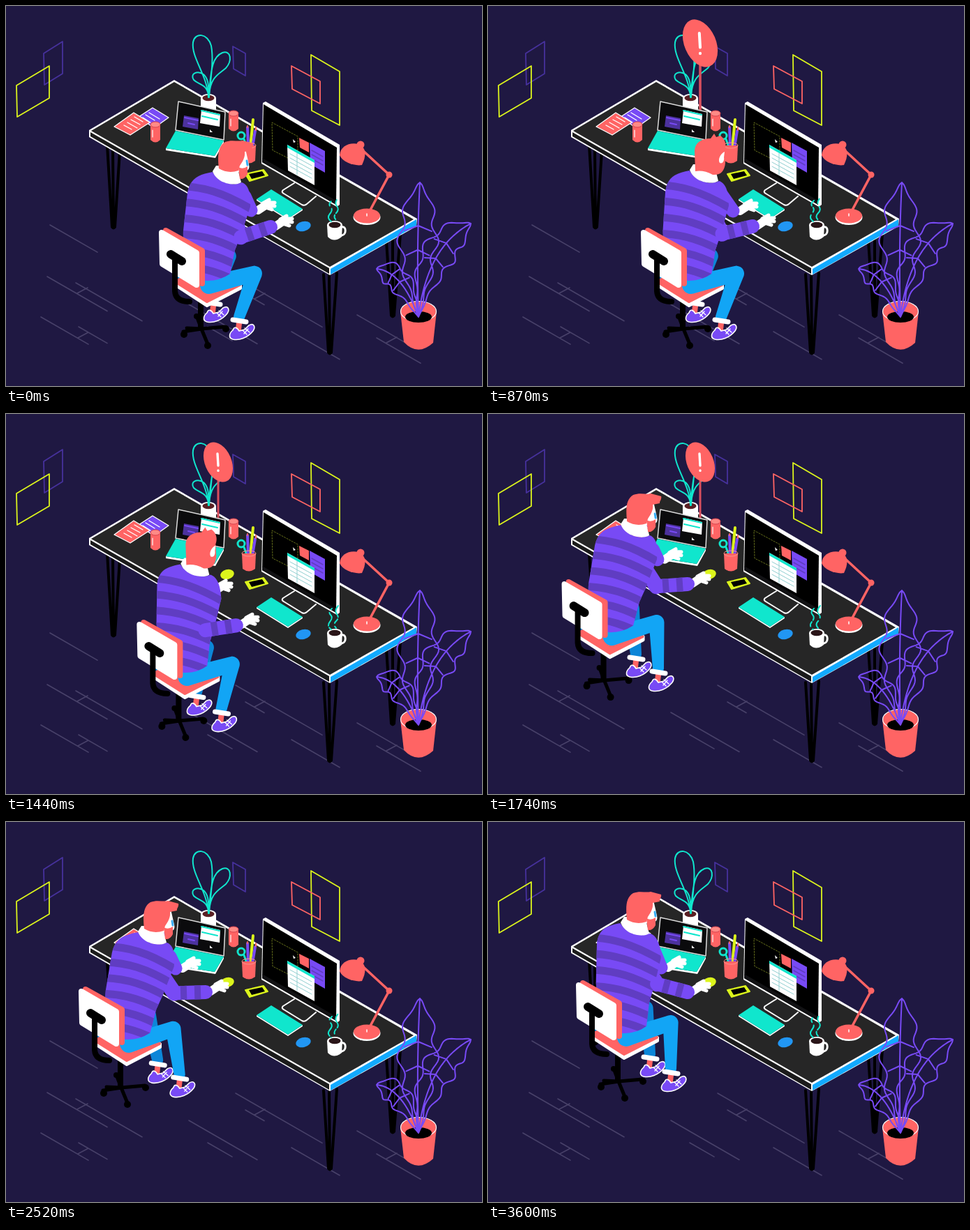
An HTML page that plays this animation: 682x545 px, repeating every 3.63 s.

```html
<!DOCTYPE html>
<html lang="en">
<head>
<meta charset="utf-8">
<title>Desk worker</title>
<style>
html, body { margin: 0; width: 100%; height: 100%; overflow: hidden; background: #1f1842; }
svg { display: block; width: 100vw; height: 100vh; }
.line { fill: none; stroke-linecap: round; stroke-linejoin: round; }
.red { fill: #ff6464; }
.white { fill: #fff; }
.black { fill: #000; }
.teal { fill: #10e6cd; }
.violet { fill: #784af5; }
.sw { stroke: #fff; }
.sk { stroke: #000; }
.sr { stroke: #ff6464; }
.st { stroke: #10e6cd; }
.sv { stroke: #784af5; }
.sy { stroke: #dcf51c; }
.stripe { stroke: #603dc2; }
</style>
</head>
<body>
<svg viewBox="0 0 682 545" preserveAspectRatio="none">
  <defs>
    <clipPath id="shirt"><path id="shirtShape" d="M296 238C275 242 264 247 260 268L254 322Q253 340 260 380L286 394Q305 395 321 384L328 350L336 330L350 288C351 265 346 256 338 253C325 259 305 254 296 238Z"/></clipPath>
    <g id="shoe">
      <path class="line sr" stroke-width="8" d="M-4 3L-5 12"/>
      <path class="violet sw" stroke-width="1.6" d="M-13 13C-11 7 -7 9 -4 14L4 12L10 6C17 2 20 8 16 14C8 24 -4 28 -13 26C-20 24 -18 17 -13 13Z"/>
      <path class="line sw" stroke-width="1.3" d="M1 13L7 19M4 10L11 16M3 18L9 11"/>
      <path class="line sw" stroke-width="7" stroke-linecap="butt" d="M-13 -2L6 1"/>
    </g>
    <g id="hand" class="line sw">
      <path stroke-width="12" d="M1 0L13 -8"/>
      <path stroke-width="5" d="M12 -11L25 -11M12 -7L25 -6M12 -4L21 -1M8 -10L17 -15"/>
    </g>
  </defs>

  <path id="floor" class="line" stroke="#484169" stroke-width="1.6"/>

  <g class="line" stroke-width="1.8">
    <path stroke="#46319c" d="M54 68L81 51V97L55 113ZM325 58L343 68V100L326 90Z"/>
    <path class="sy" d="M15 114L62 86V132L16 159ZM437 70L478 94V171L438 150Z"/>
    <path class="sr" d="M409 86L450 108V140L410 119Z"/>
  </g>

  <!-- desk -->
  <path class="line sk" stroke-width="4" d="M145 200L152 317Q154 320 156 317L163 208M153 204L154 316M455 385L462 497Q464 500 466 497L474 383M463 386L464 496M545 337L552 444Q554 447 556 444L565 327M554 334V443"/>
  <path class="white" d="M119 178L241 106L589 305L588 316L464 386L119 188Z"/>
  <path fill="#262626" d="M122 179L241 109L584 306L464 374Z"/>
  <path fill="#1b1b1b" d="M121 181L463 376V384L121 187Z"/>
  <path fill="#12aaff" d="M465 377L588 306V315L465 385Z"/>

  <!-- papers -->
  <g stroke="#fff" stroke-width="1.3" stroke-linejoin="round">
    <path class="violet" d="M190 159L210 146L233 160L212 175Z"/>
    <path class="red" d="M155 173L183 153L206 167L178 185Z"/>
    <path class="line" d="M200 156L213 164M205 153L220 162M196 160L207 167M169 171L180 177M174 167L188 175M179 163L192 170M184 159L196 166"/>
  </g>

  <!-- small plant -->
  <path class="white" d="M279 132V150H301V132Z"/>
  <ellipse class="white" cx="290" cy="132" rx="11" ry="6"/>
  <ellipse cx="290" cy="132" rx="8.5" ry="4.2" fill="#5a2024"/>
  <path class="line st" stroke-width="2" d="M290 131C289 100 265 74 268 52C271 37 289 39 294 57C298 78 293 105 291 131M290 131C294 98 293 74 310 67C323 63 324 79 315 89C305 98 293 101 291 128M290 128C288 112 276 113 269 106C263 97 274 92 283 98C291 105 290 118 291 128"/>

  <g id="sign">
    <path class="line" stroke="#d94f5e" stroke-width="3" d="M304 96V152"/>
    <ellipse class="red" cx="304" cy="69" rx="19" ry="30" transform="rotate(-23 304 69)"/>
    <path class="line sw" stroke-width="3.4" d="M303 57L304 74M304 81V81.4"/>
  </g>

  <!-- laptop -->
  <path fill="#0b0b0d" stroke="#ddd" stroke-width="1.5" stroke-linejoin="round" d="M247 137L314 152L312 192L243 178Z"/>
  <path fill="#4c329d" d="M255 157L276 161L275 177L253 173Z"/>
  <path class="line sv" stroke-width="2" d="M256 160L275 164M261 168L270 170"/>
  <path class="white" d="M280 149L307 155L306 173L278 168Z"/>
  <path class="line st" stroke-width="2" d="M280 150L306 156M281 158L303 163"/>
  <path class="white" d="M292 177L296 181L292 181Z"/>
  <path class="white" d="M229 204L299 215L312 193V196L300 218L229 207Z"/>
  <path class="teal" d="M243 179L312 193L299 215L229 204Z"/>

  <!-- cans -->
  <g id="can">
    <path class="red" d="M207 170V192Q214 199 221 192V170Z"/>
    <ellipse cx="214" cy="170" rx="7" ry="4" fill="#ff8a86" stroke="#d8434f"/>
    <path class="line sw" stroke-width="1.2" d="M210 178V188"/>
  </g>
  <use href="#can" x="112" y="-16"/>

  <!-- pen cup -->
  <g class="line">
    <circle class="st" cx="337" cy="186" r="5" stroke-width="3"/>
    <path class="st" stroke-width="3" d="M341 191L345 202"/>
    <path class="sy" stroke-width="4" d="M354 163L350 203"/>
    <path class="sv" stroke-width="4" d="M346 174L347 202M357 179L353 203"/>
    <path class="sr" stroke-width="2" d="M346 172V174M358 174V178"/>
  </g>
  <path class="red" d="M338 200L339 222Q348 229 357 222L358 200Z"/>
  <ellipse cx="348" cy="200" rx="10" ry="4" fill="none" stroke="#ff918c"/>

  <path fill="#dcf51c" stroke="#dcf51c" stroke-width="2" stroke-linejoin="round" d="M343 241L369 235L375 243L349 251Z"/>
  <path class="black" d="M348 241L367 237L371 243L352 248Z"/>
  <ellipse cx="317" cy="230" rx="10" ry="7" fill="#dcf51c" transform="rotate(-15 317 230)"/>
  <ellipse cx="426" cy="316" rx="11" ry="7" fill="#2196f3" transform="rotate(-15 426 316)"/>
  <path class="white" d="M359 277L404 305L425 291V293L404 307L359 279Z"/>
  <path class="teal" d="M380 263L425 291L404 305L359 277Z"/>

  <!-- monitor -->
  <path class="line sw" stroke-width="2" d="M413 254L397 264Q394 267 398 269L424 285Q428 287 431 284L444 273"/>
  <path class="white" d="M368 139L372 137L478 199V285L474 288L366 226Z"/>
  <path class="black" d="M369 141L474 203L473 285L367 224Z"/>
  <path fill="#121214" d="M367 218L473 279V285L367 224Z"/>
  <path class="line" stroke="#66701c" stroke-dasharray="2 2" d="M381 167L418 187V225L382 207Z"/>
  <path class="red" d="M420 189L434 196V210L421 203Z"/>
  <path class="violet" d="M435 196L457 208V239L436 227Z"/>
  <path class="line stripe" stroke-width="1.5" d="M438 207L454 216M438 213L454 222M438 219L454 228"/>
  <path class="white" d="M403 199L442 221V257L404 236Z"/>
  <path class="teal" d="M403 199L442 221V225L403 203Z"/>
  <path class="line" stroke="#91cfd1" d="M407 212L438 229M407 218L438 235M407 224L438 241M407 230L438 247M417 211V242"/>
  <path class="white" d="M411 191L415 195L412 196Z"/>

  <!-- lamp -->
  <ellipse class="white" cx="517" cy="303" rx="19.5" ry="11"/>
  <ellipse class="red" cx="517" cy="301" rx="19" ry="10.5"/>
  <path class="line sr" stroke-width="3.5" d="M511 207L549 242L519 298"/>
  <circle class="red" cx="549" cy="242" r="4.5"/>
  <circle class="red" cx="508" cy="199" r="5.5"/>
  <path class="red" d="M478 214C479 201 492 195 505 198C516 203 517 213 510 228C500 230 482 224 478 214Z"/>
  <path class="line sw" stroke-width="1.5" d="M517 298V301"/>

  <!-- mug -->
  <path class="line sw" stroke-width="3" d="M481 317C488 315 488 328 481 329"/>
  <path class="white" d="M460 314L461 331Q470 340 481 331L482 314Z"/>
  <ellipse class="white" cx="471" cy="314" rx="11" ry="6"/>
  <ellipse cx="471" cy="314" rx="8.5" ry="4.2" fill="#2a1518"/>
  <g id="steam" class="line st" stroke-width="2">
    <path d="M466 309q-7 -5 -2 -11t1 -10t2 -9"/>
    <path d="M473 307q-5 -5 0 -10t1 -10t2 -12"/>
  </g>

  <!-- floor plant -->
  <path class="red" d="M565 438L570 482Q590 503 612 483L617 438Z"/>
  <ellipse cx="591" cy="438" rx="25.5" ry="14.5" class="red sw" stroke-width="1.2"/>
  <ellipse class="black" cx="591" cy="446" rx="19" ry="8"/>
  <path id="leaves" class="line sv" stroke-width="2"/>

  <!-- worker -->
  <g id="base">
    <path class="line sk" stroke-width="8" d="M279 425V462"/>
    <path class="line sk" stroke-width="5" d="M280 463L254 467M280 463L289 485M280 463L314 460M280 463L274 447M280 463L259 462"/>
    <g class="black"><circle cx="255" cy="471" r="5"/><circle cx="289" cy="487" r="5"/><circle cx="315" cy="463" r="5"/><circle cx="273" cy="445" r="4"/></g>
  </g>
  <path id="farLeg" fill="#0c86d8"/>
  <use id="farShoe" href="#shoe"/>
  <g id="seat" stroke-linejoin="round">
    <path class="white sw" stroke-width="4" d="M242 400L288 430L336 405V400L290 380Z"/>
    <path class="red sr" stroke-width="4" d="M242 395L292 374L335 400L288 424Z"/>
  </g>
  <path id="nearLeg" fill="#12a5f5"/>
  <use id="nearShoe" href="#shoe"/>
  <use id="farHand" href="#hand"/>
  <path id="farArm" class="line sv" stroke-width="19"/>
  <path id="upperArm" class="line sv" stroke-width="22"/>
  <g id="torso">
    <use href="#shirtShape" class="violet"/>
    <path id="stripes" clip-path="url(#shirt)" class="line stripe" stroke-width="11"/>
  </g>
  <use id="nearHand" href="#hand"/>
  <path id="forearm" class="line sv" stroke-width="20"/>
  <path id="bands" class="line stripe" stroke-width="20" stroke-dasharray="9 11" stroke-dashoffset="-9" style="stroke-linecap:butt"/>
  <g id="head">
    <path class="white" d="M-22 -8L-17 -16H13L19 8C10 14 -16 10 -22 -8Z"/>
    <g id="side">
      <path class="white" d="M8 -40H25L30 -18Q32 -10 25 -8L5 -5Z"/>
      <path class="red" d="M-13 -12C-15 -32 -14 -44 -4 -50C6 -54 14 -50 21 -52L36 -48C37 -43 33 -41 34 -38L24 -36C25 -28 21 -22 17 -16L15 -9Q0 -4 -13 -12Z"/>
      <path class="red" d="M15 -14Q21 -10 28 -15L28 -4Q24 4 17 3Z"/>
      <path class="line" stroke="#38aef5" stroke-width="3" d="M27 -23L28 -17"/>
    </g>
    <g id="back">
      <path class="red" d="M-14 -6L-15 -36C-14 -48 -4 -53 8 -53L13 -60L16 -55L22 -57C29 -52 31 -44 28 -36L29 -18C28 -6 22 0 11 -1Q-2 -8 -14 -6Z"/>
      <path class="white" d="M28 -34C22 -31 18 -23 21 -18C25 -16 28 -21 27 -26Z"/>
    </g>
  </g>
  <g id="rest" stroke-linejoin="round">
    <path class="red sr" stroke-width="8" d="M229 322L281 351V398L229 367Z"/>
    <path class="white sw" stroke-width="8" d="M223 325L273 354V400L224 370Z"/>
    <path class="line sk" stroke-width="12" d="M236 356L252 366"/>
    <path class="line sk" stroke-width="8" d="M242 362V409Q243 424 263 424"/>
  </g>
</svg>
<script>
const LOOP = 3630;
const $ = id => document.getElementById(id);
const set = (id, name, value) => $(id).setAttribute(name, value);
const place = (id, [x, y]) => set(id, 'transform', `translate(${x} ${y})`);
const add = ([x, y], dx, dy) => [x + dx, y + dy];
const line = (...pts) => 'M' + pts.join('L');
const clamp = u => Math.min(1, Math.max(0, u));
const ease = u => u < .5 ? 4 * u ** 3 : 1 - (2 - 2 * u) ** 3 / 2;
const phase = (t, from, to) => ease(clamp((t - from) / (to - from)));

// The actions of the story, each running from 0 to 1
const actions = t => ({
  look: phase(t, 330, 490),
  reach: phase(t, 880, 1130),
  push: phase(t, 980, 1190),
  walk: phase(t, 1230, 1740),
  slide: phase(t, 1200, 1840),
  grab: phase(t, 1250, 1720),
  step: phase(t, 2400, 2700),
  rise: phase(t, 2620, 2810),
  scoot: phase(t, 2750, 3240)
});

// Start point of each part and how far each action carries it
const parts = {
  chair: { start: [218, 318], push: [-9, -7], slide: [-106, -75], scoot: [22, -9] },
  neck: { start: [318, 245], look: [-7, -2], push: [-22, -5], slide: [-78, -73], rise: [-6, -5], scoot: [7, -8] },
  nearFoot: { start: [338, 452], walk: [-90, -81], step: [18, -11] },
  farFoot: { start: [301, 427], walk: [-85, -76], step: [20, -12] },
  nearHand: { start: [385, 316], reach: [-33, 8], grab: [-60, -81] },
  farHand: { start: [360, 293], reach: [-45, -23], grab: [-63, -60], scoot: [5, -1] }
};

const locate = ({ start, ...moves }, act) =>
  Object.entries(moves).reduce((p, [name, [dx, dy]]) => add(p, dx * act[name], dy * act[name]), start);

// Middle joint of a two-bone limb
function joint([ax, ay], [bx, by], l1, l2, side) {
  const dx = bx - ax, dy = by - ay;
  const d = Math.min(Math.hypot(dx, dy), l1 + l2 - .01);
  const along = (l1 * l1 - l2 * l2 + d * d) / (2 * d);
  const off = side * Math.sqrt(Math.max(0, l1 * l1 - along * along));
  return [ax + (dx * along - dy * off) / d, ay + (dy * along + dx * off) / d];
}

// Round-ended bone with a radius at each end
function bone(a, b, r, s) {
  const dx = b[0] - a[0], dy = b[1] - a[1], d = Math.hypot(dx, dy);
  const edge = (p, k) => add(p, dy / d * k, -dx / d * k);
  return `M${edge(a, r)}L${edge(b, s)}A${s} ${s} 0 0 1 ${edge(b, -s)}L${edge(a, -r)}A${r} ${r} 0 0 1 ${edge(a, r)}Z`;
}

// Wavy leaf around a bent rib, with cross veins
function leaf(bend, tip, width, waves) {
  const root = [591, 446];
  const mix = (u, i) => (1 - u) ** 2 * root[i] + 2 * u * (1 - u) * bend[i] + u * u * tip[i];
  const slope = (u, i) => (1 - u) * (bend[i] - root[i]) + u * (tip[i] - bend[i]);
  const point = (u, side) => {
    const sx = slope(u, 0), sy = slope(u, 1), d = Math.hypot(sx, sy);
    const w = side * width * Math.sin(Math.PI * u ** 1.3) ** .75 * (1 + .2 * Math.sin(u * waves * 2 * Math.PI));
    return [mix(u, 0) - sy / d * w, mix(u, 1) + sx / d * w];
  };
  const run = side => line(...Array.from({ length: 61 }, (_, i) => point(i / 60, side)));
  const veins = [.5, .68].map(u => line(point(u - .04, -.85), [mix(u, 0), mix(u, 1)], point(u - .04, .85)));
  return run(-1) + run(0) + run(1) + veins.join('');
}

// Floorboard seam, with an optional short joint to the board above
const SLOPE = .576;
const seam = (x, y, len) => `M${x} ${y}l${len} ${len * SLOPE}`;
const joinAt = (x, y) => `M${x} ${y}l15 -8`;

set('leaves', 'd', leaf([588, 350], [593, 253], 25, 4) + leaf([603, 345], [666, 312], 22, 4) + leaf([567, 380], [531, 377], 16, 3));
set('floor', 'd', seam(63, 314, 68) + seam(59, 388, 86) + seam(100, 397, 95) + joinAt(102, 412)
  + seam(50, 446, 68) + seam(104, 460, 41) + joinAt(103, 476)
  + seam(329, 389, 124) + seam(343, 413, 27) + joinAt(356, 420)
  + seam(262, 428, 98) + seam(289, 460, 35) + seam(409, 467, 69)
  + seam(503, 443, 67) + seam(531, 476, 63) + joinAt(545, 483));
set('stripes', 'd', Array.from({ length: 7 }, (_, i) => `M240 ${258 + i * 23}c40 0 72 8 122 40`).join(''));

function drawSign(t) {
  const u = clamp((t - 690) / 330);
  const size = u < .45 ? 1.2 * ease(u / .45) : 1 + .2 * Math.cos((u - .45) / .55 * Math.PI / 2);
  set('sign', 'transform', `translate(304 150) scale(${size}) translate(-304 -150)`);
  set('sign', 'opacity', u > 0 ? clamp((2280 - t) / 200) : 0);
}

function drawSteam(t) {
  [...$('steam').children].forEach((p, i) => {
    p.setAttribute('stroke-dasharray', '21 5 7 3');
    p.setAttribute('stroke-dashoffset', -t / LOOP * 108 - i * 11);
  });
}

function draw(t) {
  const act = actions(t);
  const pos = {};
  for (const name in parts) pos[name] = locate(parts[name], act);
  const { chair, neck, nearHand, farHand } = pos;

  const shift = add(chair, -218, -318);
  ['base', 'seat', 'rest'].forEach(id => place(id, shift));

  const hip = add(chair, 73, 82);
  const hips = { near: hip, far: add(hip, -35, -18) };
  for (const side in hips) {
    const foot = pos[side + 'Foot'];
    const ankle = add(foot, -4, -6);
    const knee = joint(hips[side], ankle, 67, 66, -1);
    set(side + 'Leg', 'd', bone(hips[side], knee, 13, 11) + bone(knee, ankle, 11, 8));
    place(side + 'Shoe', foot);
  }

  // Shear the torso so that it joins hips and neck
  const lean = (318 + shift[0] - neck[0]) / 150;
  const tall = (395 + shift[1] - neck[1]) / 150;
  set('torso', 'transform', `matrix(1 0 ${lean} ${tall} ${shift[0] - lean * 395} ${shift[1] + 395 * (1 - tall)})`);

  // Typing: both hands at the keyboard, only the far one at the laptop
  const tap = Math.sin(t / 120 * Math.PI) * 1.3;
  const wrist = add(nearHand, 0, tap * (1 - act.reach));
  const farWrist = add(farHand, 0, -tap * (1 - act.reach + act.slide));
  const shoulder = add(neck, 2, 39);
  const elbow = joint(shoulder, wrist, 50, 51, 1);
  const sleeve = line(elbow, add(wrist, -6, 1));
  set('upperArm', 'd', line(shoulder, elbow));
  set('forearm', 'd', sleeve);
  set('bands', 'd', sleeve);
  set('farArm', 'd', line(add(neck, 24, 28), add(farWrist, -9, 0)));
  place('nearHand', wrist);
  place('farHand', farWrist);

  const away = act.look > .5 && act.slide < .3;
  place('head', neck);
  $('side').style.display = away ? 'none' : '';
  $('back').style.display = away ? '' : 'none';

  drawSign(t);
  drawSteam(t);
}

const start = performance.now();
function tick(now) {
  draw(Math.max(0, now - start) % LOOP);
  requestAnimationFrame(tick);
}
draw(0);
requestAnimationFrame(tick);
</script>
</body>
</html>
```
